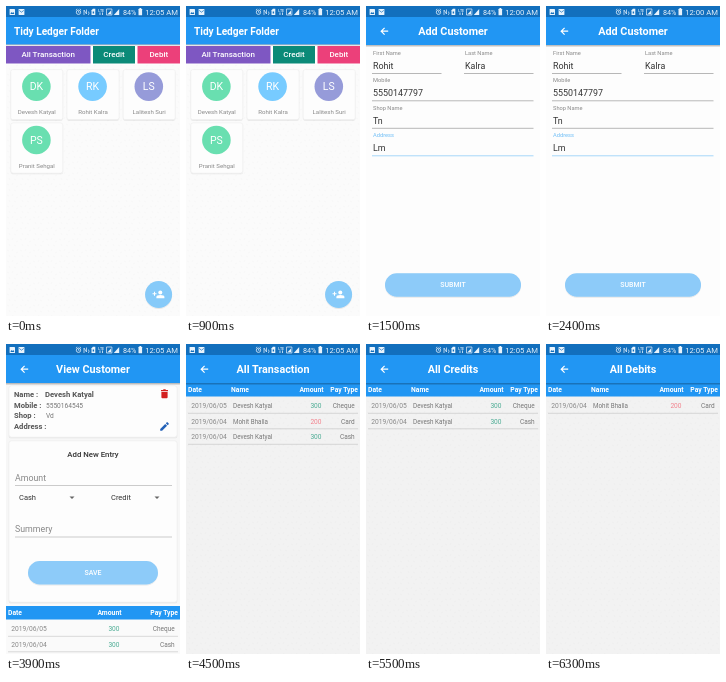
Write an HTML page that moves like this. It is 174 px wide and 310 px high and loops after 7100 ms.

```html
<!DOCTYPE html>
<html lang="en">
<head>
<meta charset="utf-8">
<title>Ledger app</title>
<style>
html, body { margin: 0; width: 100%; height: 100%; overflow: hidden; background: #fff; }
svg { display: block; width: 100vw; height: 100vh; font-family: Roboto, Arial, sans-serif; }
</style>
</head>
<body>
<svg id="stage" viewBox="0 0 174 310" preserveAspectRatio="none"></svg>
<script>
const BLUE = '#2196f3', DARK = '#126fbd', GREEN = '#4aab93', PINK = '#f2808c', GREY = '#888';
const PAYER = 'Devesh Katyal', PAYEE = 'Mohit Bhalla';

const rect = (x, y, w, h, fill, r = 0, more = '') =>
  `<rect x="${x}" y="${y}" width="${w}" height="${h}" fill="${fill}" rx="${r}" ${more}/>`;
const circle = (x, y, r, fill, more = '') => `<circle cx="${x}" cy="${y}" r="${r}" fill="${fill}" ${more}/>`;
const path = (d, fill, more = '') => `<path d="${d}" fill="${fill}" ${more}/>`;
const text = (s, x, y, size, fill, weight = 400, anchor = 'start') =>
  `<text x="${x}" y="${y}" font-size="${size}" fill="${fill}" font-weight="${weight}" text-anchor="${anchor}">${s}</text>`;
const rule = (x1, x2, y, color = '#888', w = 0.6) => path(`M${x1} ${y}H${x2}`, 'none', `stroke="${color}" stroke-width="${w}"`);
const card = (x, y, w, h) => rect(x, y, w, h, '#fdfdfd', 2, 'stroke="#ececec" stroke-width=".5" filter="url(#soft)"');

const defs = `<defs>
  <filter id="soft" x="-20%" y="-20%" width="140%" height="150%"><feDropShadow dx="0" dy=".6" stdDeviation=".6" flood-opacity=".14"/></filter>
  <linearGradient id="shade" x2="0" y2="1"><stop stop-color="#000" stop-opacity=".3"/><stop offset="1" stop-color="#000" stop-opacity="0"/></linearGradient>
  <pattern id="paper" width="13" height="11" patternUnits="userSpaceOnUse">
    <path d="M1 2l2 1M7 1l-1 2M10 5l2-1M3 7l1 2M8 8l2 1" stroke="#000" stroke-opacity=".02" stroke-width=".7"/>
  </pattern></defs>`;

const paper = color => rect(0, 0, 174, 310, color) + rect(0, 0, 174, 310, 'url(#paper)');

function statusBar(clock) {
  const white = '#e8f3fc';
  const line = (d, w = 0.7, color = white) => path(d, 'none', `stroke="${color}" stroke-width="${w}"`);
  return rect(0, 0, 174, 11, DARK) +
    rect(3.6, 3, 5.4, 6, white, 0.6) + path('M4.3 8l1.4-2 1 1 .7-.9 1 1.9z', DARK) +
    rect(12.6, 3, 5.8, 6, white, 0.6) + line('M13.2 4.4l2.3 1.8 2.3-1.8', 0.7, DARK) +
    circle(72.5, 6.2, 2.2, 'none', `stroke="${white}" stroke-width=".8"`) +
    line('M72.5 4.8v1.5h1M69.9 4l1.3-1.2M75.1 4l-1.3-1.2') +
    line('M78 9V4l2.5 4V3.5M82 5.5a2 2 0 0 1 0 3.5') +
    path('M85.5 9V4.2l1.4-1.4h2.4V9z', white) + path('M86.7 5.5h1.4v2h-1.4z', DARK) +
    text('LTE', 92.3, 5.8, 3.6, white, 500) + line('M94 6.5v2.5M96.5 9v-2.5', 0.8) +
    line('M100.5 3h5.4v6h-5.4z') + path('M101.5 8.2l3.5-3.8v3.8z', white) + path('M107.8 9l5.4-6v6z', white) +
    text('84%', 117, 8.8, 7.2, white) +
    rect(132.5, 2.8, 3.6, 6.4, white, 0.5) + rect(133.5, 2, 1.6, 1, white) +
    text(clock, 172, 8.9, 7.7, white, 400, 'end');
}

const header = (title, clock = '12:05 AM') =>
  rect(0, 39, 174, 2.5, 'url(#shade)') + rect(0, 10, 174, 29, BLUE) + statusBar(clock) +
  text(title, 87, 29.1, 10.8, '#fff', 700, 'middle') +
  path('M22.2 25.2H15.4M18.6 21.8l-3.4 3.4 3.4 3.4', 'none', 'stroke="#fff" stroke-width="1.2"');

const button = (x, y, w, h, label) => rect(x, y, w, h, '#8dcbf9', h / 2, 'filter="url(#soft)"') +
  text(label, 87, y + h / 2 + 2.4, 7, '#fff', 500, 'middle');

// Rows hold [date, name, amount, type, amount color]
function table(top, amountX, rows, named) {
  const bold = (s, x, anchor) => text(s, x, top + 9.2, 6.8, '#fff', 700, anchor);
  return rect(0, top, 174, 13.5, BLUE) + bold('Date', 2) + (named ? bold('Name', 45) : '') +
    bold('Amount', amountX, 'end') + bold('Pay Type', 172, 'end') +
    rows.map(([date, name, amount, type, color], i) => {
      const y = top + 25.2 + i * 15.5;
      return text(date, 5.3, y, 6.7, GREY) + (named ? text(name, 47, y, 6.3, '#777') : '') +
        text(amount, amountX - 2, y, 6.6, color, 400, 'end') +
        text(type, 168.7, y, 6.5, '#777', 400, 'end') + rule(2, 172, y + 5.1, '#b4b4b4', 0.5);
    }).join('');
}

const cheque = ['2019/06/05', PAYER, 300, 'Cheque', GREEN];
const cash = ['2019/06/04', PAYER, 300, 'Cash', GREEN];
const debit = ['2019/06/04', PAYEE, 200, 'Card', PINK];

function home() {
  const tab = (x, w, color, label) => rect(x, 40, w, 17.5, color) +
    text(label, x + w / 2, 51.2, 8, '#fff', 500, 'middle');
  const person = (x, y, color, initials, name) => card(x, y, 52, 50) +
    circle(x + 25.6, y + 17, 14.3, color) + text(initials, x + 25.6, y + 20.7, 10.5, '#fff', 400, 'middle') +
    text(name, x + 26, y + 44.6, 6.1, GREY, 400, 'middle');
  return paper('#fbfbfb') + rect(0, 10, 174, 29, BLUE) + statusBar('12:05 AM') +
    text('Tidy Ledger Folder', 8, 29, 10.1, '#fff', 700) +
    rect(0, 38.5, 174, 20, '#fff') + rect(0, 38.5, 174, 1.5, 'url(#shade)') +
    tab(0, 84.5, '#7e57c2', 'All Transaction') + tab(87, 42, '#0b8a78', 'Credit') + tab(131.5, 42.5, '#ec407a', 'Debit') +
    person(4.8, 63.6, '#69dfb0', 'DK', PAYER) + person(61, 63.6, '#77cbff', 'RK', 'Rohit Kalra') +
    person(117.2, 63.6, '#969bd9', 'LS', 'Lalitesh Suri') + person(4.8, 117, '#69dfb0', 'PS', 'Pranit Sehgal') +
    circle(152.6, 288.5, 13.5, '#86caf9', 'filter="url(#soft)"') + circle(154.3, 286.4, 2, '#fff') +
    path('M150.4 292.2v-1.2q0-1.9 4-1.9t4 1.9v1.2zM148 285.8h1v1.5h1.5v1h-1.5v1.5h-1v-1.5h-1.5v-1h1.5z', '#fff');
}

function addCustomer() {
  const field = (label, value, x, end, y, color = '#888') =>
    text(label, x, y, 5.7, color) + text(value, x, y + 14, 8.9, '#333') + rule(x - 1, end, y + 18.8, color);
  return rect(0, 0, 174, 310, '#fdfdfd') + header('Add Customer', '12:00 AM') +
    field('First Name', 'Rohit', 7, 75.5, 48.7) + field('Last Name', 'Kalra', 99, 167.5, 48.7) +
    field('Mobile', '5550147797', 7, 167.5, 76) + field('Shop Name', 'Tn', 7, 167.5, 103.5) +
    field('Address', 'Lm', 7, 167.5, 131, '#6bbcf5') + button(19, 267.3, 136, 23.5, 'SUBMIT');
}

function viewCustomer() {
  const label = (s, y) => text(s, 8, y, 7.6, '#555', 700);
  const arrow = x => path(`M${x - 2.5} 152.5h5l-2.5 2.6z`, '#666');
  return rect(0, 0, 174, 310, '#f7f7f7') + header('View Customer') +
    card(3, 42, 168, 51) + label('Name :', 52.8) + label('Mobile :', 63.8) + label('Shop :', 74.4) + label('Address :', 85) +
    text(PAYER, 39, 52.8, 7.7, '#555', 700) + text('5550164545', 40, 63.8, 6.6, '#777') + text('Vd', 40, 74.4, 6.6, '#777') +
    path('M155 46h2l.6-.8h1.8l.6.8h2v1.2h-7zM155.4 47.9h6.2v5.3q0 1-1 1h-4.2q-1 0-1-1z', '#d32020') +
    path('M154.2 86.8v-1.9l5-5 1.9 1.9-5 5zM159.8 79.3l1-1q.4-.3.8 0l1.1 1.1q.3.4 0 .8l-1 1z', '#2462b8') +
    card(3, 97, 168, 161) + text('Add New Entry', 87, 113, 7.8, '#333', 500, 'middle') +
    text('Amount', 9, 137, 8.8, '#888') + rule(9, 166, 141.5, '#aaa') +
    text('Cash', 13, 156.3, 7.5, '#333') + arrow(66) + text('Credit', 105, 156.3, 7.5, '#333') + arrow(151) +
    text('Summery', 9, 188, 8.8, '#888') + rule(9, 166, 193, '#aaa') +
    button(22, 217, 130, 23.5, 'SAVE') + rect(0, 260, 174, 50, '#fafafa') + table(262, 115.5, [cheque, cash]);
}

const list = (title, rows) => paper('#f2f2f2') + table(39, 137.5, rows, true) + header(title);

const screens = [
  [1500, home()],
  [1500, addCustomer()],
  [1500, viewCustomer()],
  [1000, list('All Transaction', [cheque, debit, cash])],
  [800, list('All Credits', [cheque, cash])],
  [800, list('All Debits', [debit])]
];
const loop = screens.reduce((sum, [ms]) => sum + ms, 0);

const stage = document.getElementById('stage');
stage.innerHTML = defs + screens.map(([, art], i) => `<g class="screen" display="${i ? 'none' : 'inline'}">${art}</g>`).join('');
const groups = [...stage.querySelectorAll('.screen')];
const start = performance.now();
let shown = 0;

function tick() {
  let t = (performance.now() - start) % loop, now = 0;
  while (t >= screens[now][0]) t -= screens[now++][0];
  if (now !== shown) {
    groups[shown].setAttribute('display', 'none');
    groups[now].setAttribute('display', 'inline');
    shown = now;
  }
  requestAnimationFrame(tick);
}
tick();
</script>
</body>
</html>
```
